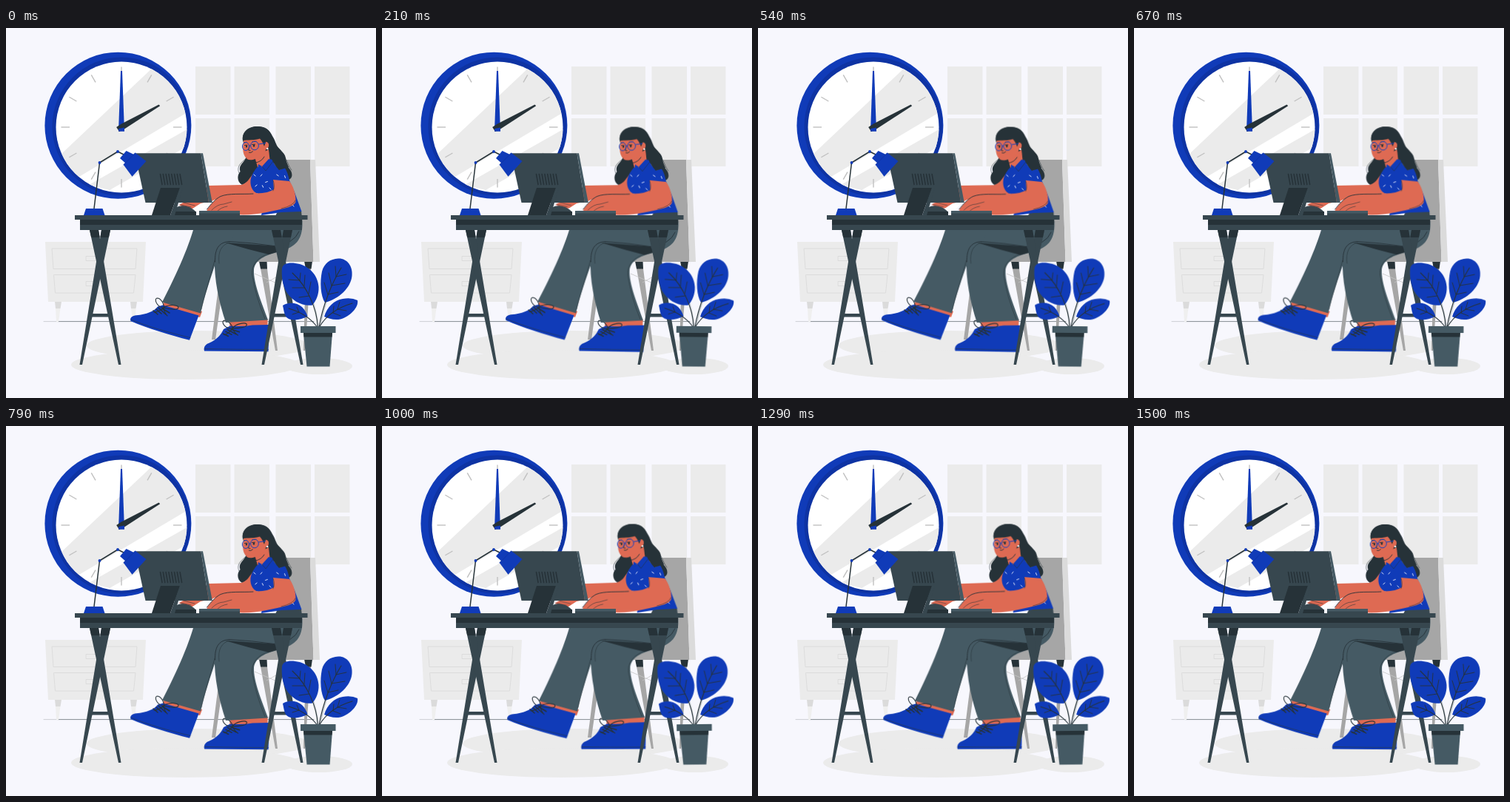
Recreate the animation shown at these times as an HTML page. Size 500x500 px, loop 1.54 s.

```html
<!DOCTYPE html>
<html lang="en">
<head>
<meta charset="utf-8">
<title>Working at the desk</title>
<style>
  html, body { margin: 0; width: 100%; height: 100%; overflow: hidden; background: #f7f7fd; }
  svg { display: block; width: 100vw; height: 100vh; }
  .blue { fill: #103bb8; }
  .navy { fill: #0e33a3; }
  .ink { fill: #263238; }
  .slate { fill: #37474f; }
  .steel { fill: #455a64; }
  .skin { fill: #de6a53; }
  .pale { fill: #ebebeb; }
  .mid { fill: #a6a6a6; }
  .light { fill: #dbdbdb; }
  .white { fill: #fff; }
  .line { fill: none; stroke: #263238; stroke-width: .9; stroke-linecap: round; stroke-linejoin: round; }
  .thin { stroke-width: .55; }
  .bold { stroke-width: 1.5; }
  .soft { fill: none; stroke: #d9d9d9; stroke-width: .8; }
  .tick { stroke: #c0c0c0; stroke-width: 1.4; }
  #woman { transform-origin: 284px 285px; }
  #plant { transform-origin: 424px 384.5px; }
</style>
</head>
<body>
<svg viewBox="0 0 500 500" xmlns="http://www.w3.org/2000/svg">
  <defs>
    <clipPath id="dial"><circle cx="156" cy="134" r="88.5"/></clipPath>
  </defs>

  <g id="window" class="pale"></g>

  <g id="floor">
    <ellipse class="pale" cx="259" cy="429" rx="150" ry="20"/>
    <ellipse class="pale" cx="242" cy="455" rx="154" ry="20"/>
    <ellipse class="pale" cx="423" cy="457" rx="45" ry="11"/>
    <path class="line thin" d="M70 396.6H416"/>
    <path class="line thin" style="stroke:#a9adb0" d="M51 396.6H70"/>
  </g>

  <g id="cabinet">
    <path class="pale" d="M53 289H189L185 370H57Z"/>
    <path class="soft" d="M62 298H177L175 325.500H64ZM64.500 333.500H175L172.500 358H66.500ZM108 308.500H126V314.500H108ZM108 342.500H126V348.500H108Z"/>
    <path class="light" d="M66 370H75L73.500 379H67ZM168 370H177L175.500 379H169Z"/>
    <path fill="#efefef" d="M67 379H73.500L71 397H68ZM169 379H175.500L174.500 397H171.500Z"/>
  </g>

  <g id="clock">
    <circle class="blue" cx="151.400" cy="131.700" r="99"/>
    <circle class="navy" cx="156" cy="133" r="93.500"/>
    <circle class="white" cx="156" cy="134" r="88.500"/>
    <g clip-path="url(#dial)" class="pale">
      <path d="M60 184L201 51L260 105L92 205Z"/>
      <path d="M112 212L250 134V157L140 219Z"/>
    </g>
    <g id="ticks"></g>
    <path class="blue" d="M155 58H157L160 139.500H152Z"/>
    <path class="ink" d="M206.500 103.500L208.200 105.200L160 136.500L153 140L149.200 134L156 129.500Z"/>
    <path class="blue" d="M152.300 136L159.800 134.500L160 139.500H152Z"/>
  </g>

  <g id="chair">
    <path class="mid" d="M287 350H293L283 421H278Z"/>
    <path class="mid" d="M344 325H353L367 436H364ZM405 325H412L404 436H402Z"/>
    <path class="soft" style="stroke:#c6c6c6" d="M336 332L366 345M352 344L386 325"/>
    <path class="ink" d="M342 315H352.500L353 325.500H344ZM403 315H414L412.500 325.500H405Z"/>
    <path class="mid" d="M376 178H411L415.500 316H338Q332 316 332 306L376 250Z"/>
    <path class="light" d="M411 178H418L424 316H415.500Z"/>
  </g>

  <g id="woman">
    <!-- far leg -->
    <path class="skin" d="M214 369L265 383L262 391L211 378Z"/>
    <path class="blue" d="M168.500 396C167 392 170 389 176 388.300C190 387 200 383 205 376.500L212 374.500L260.500 388.500L248 421.800C222 415 191 406 168.500 396Z"/>
    <path class="line thin" d="M169 394C190 403 222 412 249 418.500"/>
    <path class="steel" d="M256 262C249 291 232 330 211 370.500L263 385.500C268 362 276 340 285 312L340 262Z"/>
    <path class="line thin" d="M282 314C275 340 268 362 264 380"/>
    <g id="laces">
      <path class="line" style="stroke-width:1.100" d="M212 378C203 376 200 366 204 365C210 365 214 374 213 378C219 373 231 374 233 377C234 382 221 380 213 378M213 378Q214 385 218 389M213 378Q206 384 200 384"/>
      <path class="line bold" d="M203 380L210 386M206 378L216 387M199 382L205 387M211 379L221 385"/>
    </g>

    <!-- near leg -->
    <path class="skin" d="M303 393H353.500V403H302Z"/>
    <path class="blue" d="M268 436.500C266.500 431 270 427 275 425.500C285 421 291 414 294 407L303 402.500Q320 404 333 401.500L355.500 401L354.500 437.300Z"/>
    <path class="line thin" d="M268.500 433.500Q312 434.500 354.500 434.500"/>
    <use href="#laces" transform="rotate(-14 213 378) translate(83.500 49.500)"/>
    <path class="slate" d="M368 246L399 247L400.500 262H360Z"/>
    <path class="steel" d="M320 262H400.500C401 287 391 296 370 302C350 307 337 313 335 326C334 345 346 372 354 394.500L297 398C288 371 281 340 282 311C283 297 291 291 303 287Z"/>
    <path class="ink" d="M296 290L363 294.500L369 302L355 306Q326 299 296 290Z"/>
    <path class="line" d="M282.500 316C282 299 287 290 301 288.500Q332 290 362 294.500Q389 292 396 275"/>
    <path class="line thin" d="M288 318C286 302 291 293 302 290M358 304C341 309 332 318 332.500 333Q337 362 350 393"/>

    <!-- hair behind -->
    <path class="ink" d="M326 170C324 182 313 184 316.500 194C312 199 312 208 319 212C327 209 333 203 341 188L350 181C363 182 370 204 378 206C389 205 388 195 382 189C376 181 381 174 373 167C364 160 365 153 360 146C355 134 344 131 333 134C323 137 319 144 320 152Z"/>

    <!-- far arm -->
    <path class="skin" d="M333 198C328 205 325 210 318 212L274 213L241 235L234 239L242 244H258L282 232L340 225Z"/>
    <path class="line thin" d="M236 239L250 242M240 236L255 240"/>

    <!-- torso -->
    <path class="blue" d="M342 186L356 178C370 175 380 189 383 206L390 222L399.500 248L372 249L345 253L350 224H341C332 222 329 211 331 203C333 196 337 190 342 186Z"/>
    <path class="skin" d="M336 174L355 164L356.500 178L347 188L340 188Z"/>
    <path class="line" d="M337 182Q345 181 349 174"/>
    <path class="blue" d="M355 177L361 179L351 193L346 187ZM341 184L346 187L340 194Z"/>
    <path class="line thin" d="M346 187L351 193L361 180"/>
    <g id="dashes" stroke="#dfe5fa" stroke-width=".9" stroke-linecap="round"></g>

    <!-- near arm -->
    <path class="skin" d="M361 205L383 207C388 213 392 225 391.500 234C391 242 372 245 352 249C338 252 324 253 310 252C298 248 288 248 280 249C275 249 270 248 272 245C276 239 282 232 289 228C300 222 320 225 339 223.500Q355 223 362 218Z"/>
    <path class="line" d="M271.500 245C277 238 283 231 290 227.500C301 223 318 225 334 224"/>
    <path class="line thin" d="M278 246Q286 238 294 238L305 235M285 248Q291 242 299 241M361 206Q364 214 361 220M391 233Q389 240 372 244"/>

    <!-- head -->
    <path class="skin" d="M322 148C320 157 319 167 322.500 173C325 178.500 330 179.500 337 177C346 174 351 169 351 164C356 163 357 154 352 154L344 142Z"/>
    <path class="ink" d="M320 152C318 139 330 132 341 133C354 134 359 141 361 152C364 160 371 162 375 171L382 188L369 192C360 182 357 174 355 163C356 156 354 153 351 154L349 160C347 155 345.500 152 343 149.500C336 152 327 151 320 152Z"/>
    <path class="line thin" d="M325 176C317 182 311 188 315 196M375 172C381 180 381 186 386 192"/>
    <path class="line" d="M321.500 155L325 154.300M333 153.700L338 153.300"/>
    <ellipse class="ink" cx="325" cy="160" rx="1.200" ry="1.600"/>
    <ellipse class="ink" cx="335" cy="159" rx="1.300" ry="1.700"/>
    <path class="line" d="M322.500 158.500L326 158.200M332.500 157.500L336.500 157.200M329 160L327.500 165L330 165.500M328.500 168.300Q331 169.500 333.500 166.800"/>
    <g fill="none" stroke="#1b43bd">
      <ellipse cx="324" cy="160" rx="4.500" ry="5.500"/>
      <ellipse cx="336" cy="159" rx="5.400" ry="5.800"/>
      <path d="M328.500 159L330.600 158.500M341.300 157L351 155.500"/>
    </g>
    <circle class="white" cx="353.300" cy="163" r="1.200"/>
  </g>

  <g id="desk">
    <path class="white" d="M249 246L263 237L278 234L268 244L261 248Z"/>
    <path class="steel" d="M261 247H316V253.500H261Z"/>
    <path class="slate" d="M261 250.500H316V253.500H261Z"/>
    <path class="slate" d="M225 249C227 243 234 239.500 241 240.500C248 241.500 253 244 257 249V253H225Z"/>
    <path class="ink" d="M225 248H257V253H225Z"/>

    <path class="slate" d="M174 169.300H263.500L274 236H188.500Z"/>
    <path class="steel" d="M263.500 169.300H266L278.800 236H274Z"/>
    <path class="ink" d="M209 216H235L222 253H197Z"/>
    <path class="slate" d="M235 216H239L228 253H222Z"/>
    <g id="vents" class="line bold"></g>

    <path class="line bold" d="M119 244L126.500 182L151 167L161 172"/>
    <circle class="blue" cx="126.500" cy="182" r="1.900"/>
    <circle class="blue" cx="151" cy="167" r="1.900"/>
    <path class="blue" d="M108 244H130.500L133.500 253H105Z"/>
    <path class="blue" d="M154 176L162.500 166L173 171L163 184Z"/>
    <path class="blue" d="M158.500 184.500L174.500 168.500L189.500 180L170.500 200.700Z"/>
    <path class="line thin" style="stroke:#0c2f9a" d="M159 185L174.500 169"/>

    <g id="trestle">
      <path class="slate" d="M116 386H138.500V390.500H116Z"/>
      <path class="slate" d="M129 273H141L103 455H99.500Z"/>
      <path class="slate" d="M113 273H125L155.500 455H152Z"/>
      <path class="ink" d="M113 273H125L126.700 283H115.200ZM129 273H141L138.900 283H127.400Z"/>
    </g>
    <use href="#trestle" x="246"/>
    <path class="slate" d="M93 253H407.500V259H93ZM100 265H400V273H100Z"/>
    <path class="ink" d="M100 259H400V266H100Z"/>
  </g>

  <g id="plant">
    <path fill="none" stroke="#c9ced1" stroke-width="2.200" d="M421 404Q420 380 411 362M424 404Q428 385 434 365"/>
    <path class="blue" d="M373 325C374 317 385 316 397 319C413 324 422 337 422.500 350C423 360 419 369 414 374.500C400 376 386 369 378 355C374 347 372 335 373 325Z"/>
    <path class="blue" d="M449 311.500C461 311 469 322 467.500 335C466 351 450 366 431 371C425 362 424 343 427 329C430 318 438 312 449 311.500Z"/>
    <path class="blue" d="M374 375C382 370 393 371 400 377Q405 382 407.500 389.500C400 394 390 396 382 393C376 390 376 384 374 375Z"/>
    <path class="blue" d="M475 368C477 377 465 390 452 393.500C444 395 436 393 430 390C434 377 443 368 455 366Q467 364 475 368Z"/>
    <path class="line" style="stroke-width:1.100" d="M421.500 404C420 380 408 350 387 331M423 404C428 375 440 345 453 324M420.500 404Q407 386 382 379M423.500 404Q437 381 468 372"/>
    <path class="line" d="M397 341L398 331M403 349L404 334M409 359L412 343M397 341L382 340M404 351L387 351M410 362L396 364
      M446 336L445 322M440 348L436 331M435 360L430 344M446 336L460 333M440 348L458 345M435 360L449 357
      M396 384L393 377M396 384L387 387M448 380L451 370M442 385L443 376M448 380L460 382M442 385L452 389"/>
    <path class="steel" d="M398 403H445.500V412H398Z"/>
    <path class="steel" d="M402 412H441L437.500 457.500H406.500Z"/>
    <path class="ink" d="M402 412H441L440.500 417.500H402.500Z"/>
  </g>
</svg>
<script>
  const NS = "http://www.w3.org/2000/svg";
  const LOOP = 1540;

  function add(parent, tag, attrs) {
    const el = document.createElementNS(NS, tag);
    for (const key in attrs) el.setAttribute(key, attrs[key]);
    document.getElementById(parent).append(el);
  }

  // Window panes
  for (const x of [256, 308.5, 364.5, 417])
    for (const y of [52, 122]) add("window", "rect", { x, y, width: 47.5, height: 65 });

  // Hour marks
  for (let h = 0; h < 12; h++)
    add("ticks", "path", { d: "M156 52.500V64", class: "tick", transform: `rotate(${h * 30} 156 134)` });

  // Monitor vents
  for (let i = 0; i < 8; i++)
    add("vents", "path", { d: `M${208.5 + i * 3.8} 197.500l2.500 14` });

  // Shirt print
  const print = [[336, 199, 40], [345, 199, -50], [347, 214, 60], [364, 185, 50], [372, 190, -30],
    [367, 199, 35], [377, 201, 70], [352, 208, -20], [338, 213, -40], [357, 217, 45], [388, 240, 50]];
  for (const [x, y, turn] of print)
    add("dashes", "path", { d: "M-1.500 0H1.500", transform: `translate(${x} ${y}) rotate(${turn})` });

  // Gentle sway: linear out, back through centre, and home
  const sway = [[0, 0], [.25, 1], [.75, -1], [1, 0]].map(([offset, deg]) =>
    ({ offset, transform: `rotate(${deg}deg)` }));
  for (const id of ["woman", "plant"])
    document.getElementById(id).animate(sway, { duration: LOOP, iterations: Infinity });
</script>
</body>
</html>
```
